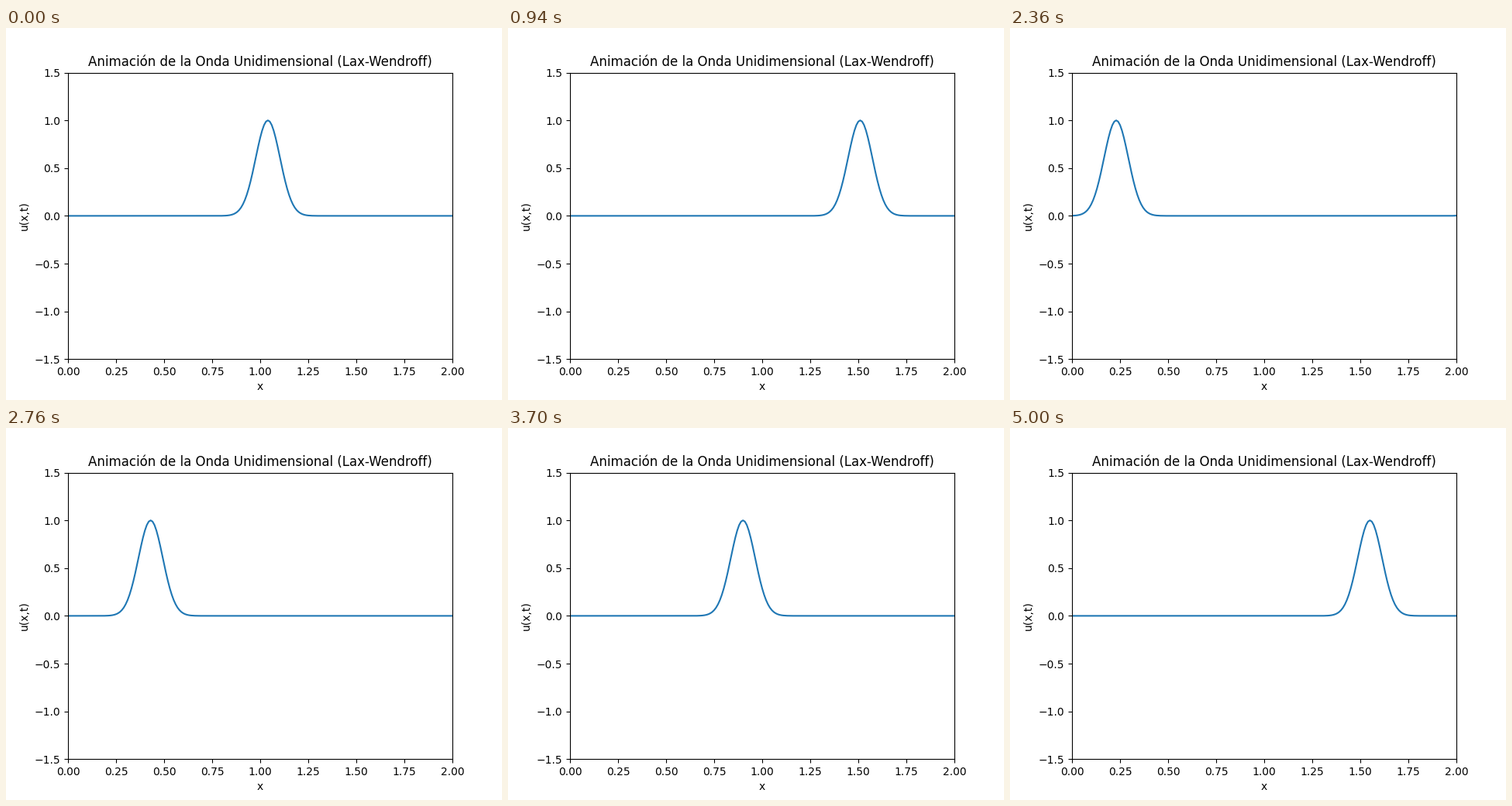
Write a matplotlib script that moves like this. It is 640 px wide and 480 px high and loops after 5020 ms.

```python
import numpy as np
import matplotlib.pyplot as plt
from matplotlib.animation import FuncAnimation

FRAMES, INTERVAL = 251, 20
DX = 0.01              # grid step, also the distance travelled per frame
PERIOD = 1.99          # the ghost cells shorten the periodic domain by one step
START, SHARPNESS = 1.04, 125

plt.rcParams["font.family"] = "DejaVu Sans"

x = np.linspace(0, 2, 201)


def wave(step):
    """Gaussian pulse advected at CFL = 1, so its shape is kept exactly."""
    d = x - START - step * DX
    d -= PERIOD * np.round(d / PERIOD)
    return np.exp(-SHARPNESS * d**2)


fig, ax = plt.subplots(figsize=(6.4, 4.8), dpi=100)
line, = ax.plot(x, wave(0))
ax.set_xlim(0, 2)
ax.set_ylim(-1.5, 1.5)
ax.set_xlabel("x")
ax.set_ylabel("u(x,t)")
ax.set_title("Animación de la Onda Unidimensional (Lax-Wendroff)")


def update(step):
    line.set_ydata(wave(step))
    return line,


anim = FuncAnimation(fig, update, frames=FRAMES, interval=INTERVAL,
                     repeat=True, repeat_delay=0)
plt.show()
```
